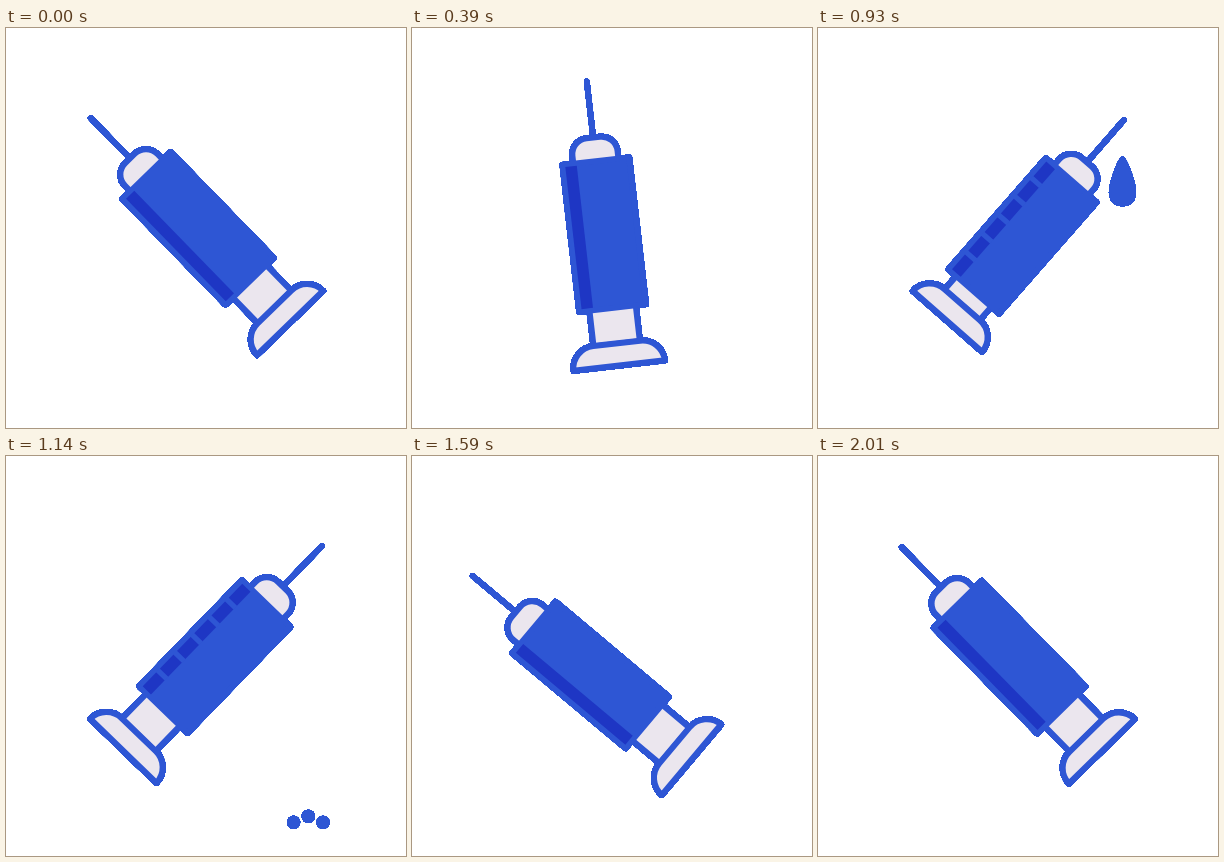
An HTML page for the animation above (2.07 s loop, 400 by 400 pixels).

```html
<!DOCTYPE html>
<html>
<head>
<meta charset="utf-8">
<style>
  html, body { margin: 0; width: 100%; height: 100%; overflow: hidden; background: #fff; }
  svg { display: block; width: 100vw; height: 100vh; }
  .line { fill: none; stroke: #2e56d4; stroke-width: 6; stroke-linejoin: round; }
  .pale { fill: #ebe6ee; }
  .blue { fill: #2e56d4; }
</style>
</head>
<body>
<svg viewBox="0 0 400 400">
  <!-- hard outer edges: any partly covered pixel becomes opaque -->
  <filter id="hard" filterUnits="userSpaceOnUse" x="0" y="0" width="400" height="400" color-interpolation-filters="sRGB">
    <feComponentTransfer><feFuncA type="linear" slope="30"/></feComponentTransfer>
  </filter>
  <g filter="url(#hard)">
    <g id="syringe">
      <g id="plunger">
        <path class="line pale" d="M-23.3 40V110H23.3V40"/>
        <path class="line pale" d="M-46 131.8A22.5 22.3 0 0 1 -23.5 109.5H23.5A22.5 22.3 0 0 1 46 131.8Z"/>
      </g>
      <path class="line" style="stroke-width:5.6" stroke-linecap="round" d="M0 -98V-154"/>
      <path class="line pale" d="M-22.7 -65V-81.7A16 16 0 0 1 -6.7 -97.7H6.7A16 16 0 0 1 22.7 -81.7V-65"/>
      <rect class="line" style="fill:#2e56d4" x="-33.5" y="-73.8" width="67" height="147.6"/>
      <rect x="-31" y="-71.5" width="11.5" height="143" fill="#1e36c4"/>
      <path id="marks" class="line" style="stroke-width:5.2"/>
    </g>
    <path id="drop" class="blue" d="M0 0C4 0 13.5 25 13.5 36C13.5 45 8 50 0 50S-13.5 45 -13.5 36C-13.5 25 -4 0 0 0Z"/>
    <g id="splash" class="blue"><circle/><circle/><circle/></g>
  </g>
</svg>
<script>
const LOOP = 2070, STEP = 30;
const $ = id => document.getElementById(id);
const ramp = (t, a, b) => Math.min(1, Math.max(0, (t - a) / (b - a)));
const smooth = p => p * p * (3 - 2 * p);

// time, angle, pivot x, pivot y, plunger travel
const poses = [
  [0, -44.2, 200.5, 209, 0],
  [195, -50, 187.7, 226.7, 0],
  [606, 44.2, 200.5, 209, 0],
  [885, 41, 196.3, 217.4, -19.3],
  [1168, 44.2, 200.5, 209, 0],
  [1578, -50, 187.7, 226.7, 0],
  [LOOP, -44.2, 200.5, 209, 0]
];

function poseAt(t) {
  const i = poses.findIndex(p => p[0] > t);
  const a = poses[i - 1], b = poses[i];
  const p = smooth(ramp(t, a[0], b[0]));
  return a.map((v, k) => v + (b[k] - v) * p);
}

function drawSyringe(t) {
  const [, angle, x, y, push] = poseAt(t);
  $('syringe').setAttribute('transform', `translate(${x} ${y}) rotate(${angle}) translate(0 -12)`);
  $('plunger').setAttribute('transform', `translate(0 ${push})`);
  const len = 13 * (ramp(t, 400, 550) - ramp(t, 1340, 1490));
  $('marks').setAttribute('d', len > 0
    ? [-2, -1, 0, 1, 2].map(n => `M-32 ${n * 24.7}h${len}`).join('') : '');
}

function drawDrop(t) {
  const size = t < 1095 ? smooth(ramp(t, 720, 870)) : 0;
  const fall = 0.0036 * Math.max(0, t - 831) ** 2;
  $('drop').setAttribute('transform', `translate(304.5 ${93 + fall}) scale(${size})`);
}

function drawSplash(t) {
  const p = ramp(t, 1095, 1495);
  const dist = 86.5 * (1 - (1 - p) ** 2.3);
  [...$('splash').children].forEach((dot, i) => {
    const a = (i - 1) * Math.PI / 4;
    dot.setAttribute('cx', 302.3 + dist * Math.sin(a));
    dot.setAttribute('cy', 381 - dist * Math.cos(a));
    dot.setAttribute('r', p > 0 ? 7.4 * (1 - p) : 0);
  });
}

function frame() {
  const now = performance.now() % LOOP;
  const t = Math.min(LOOP - 2 * STEP, Math.floor(now / STEP) * STEP);
  drawSyringe(t);
  drawDrop(t);
  drawSplash(t);
  requestAnimationFrame(frame);
}
frame();
</script>
</body>
</html>
```
